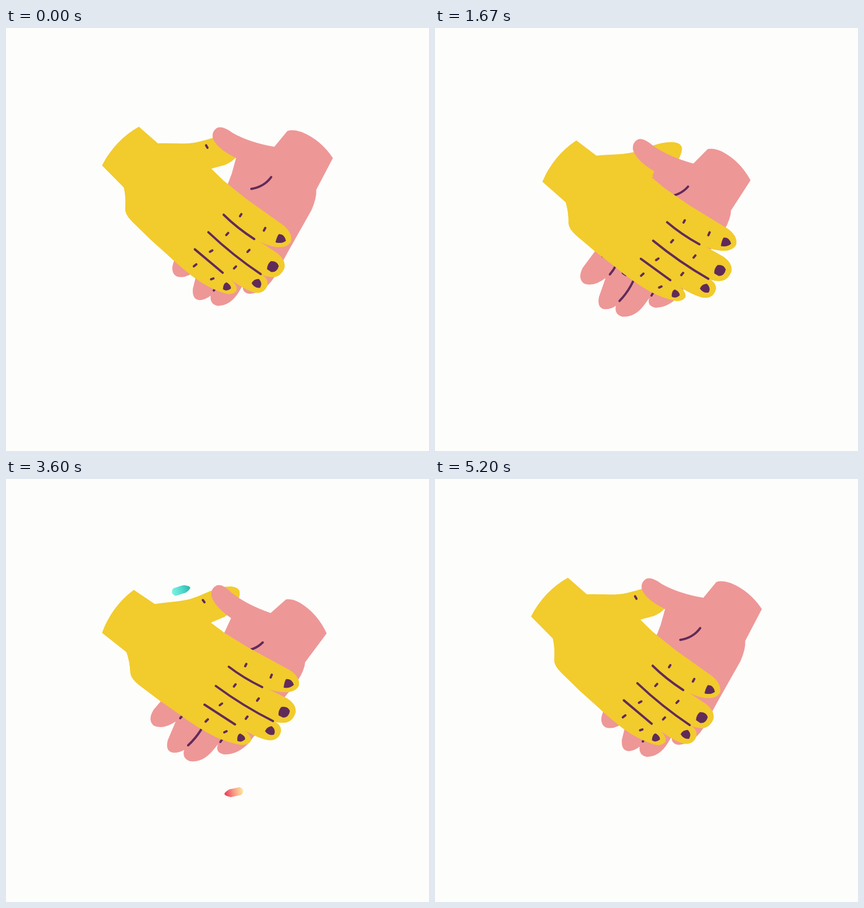
These frames come from a looping animation (748x748 px, 5.23 s). An HTML page with a canvas:

```html
<!DOCTYPE html>
<html lang="en">
<head>
<meta charset="utf-8">
<title>Handshake</title>
<style>
  html, body { margin: 0; width: 100%; height: 100%; overflow: hidden; background: #fdfdfb; }
  canvas { display: block; width: 748px; height: 748px; }
</style>
</head>
<body>
<canvas id="stage" width="748" height="748"></canvas>
<script>
const ctx = document.getElementById('stage').getContext('2d');
const YELLOW = '#f2cb2d', PINK = '#ee9797', PLUM = '#602b59';
const LOOP = 5230, CYCLE = 52;
const shape = (...parts) => new Path2D(parts.join(''));

// Open hands: the yellow one reaches across the pink one.
const open = {
  yellow: shape(
    'M170 272Q187 225 226 196L263 221C290 217 315 217 335 209C355 202 373 190 397 190',
    'Q416 191 413 206Q408 231 386 244L362 254L386 272L430 299L502 338Q520 350 518 365',
    'Q512 378 490 377Q475 376 463 371L497 388Q514 399 512 413Q506 432 488 431',
    'Q479 431 473 428Q488 435 486 447Q482 462 466 462Q450 460 422 445',
    'Q435 454 433 463Q428 471 415 470Q395 467 370 456Q338 440 305 415L272 392',
    'L235 364Q221 353 220 343Q219 322 213 306Z'),
  yellowNails: shape(
    'M491 369Q492 359 495 354Q505 352 509 364Q502 371 491 369Z',
    'M482 418Q481 409 487 403Q498 401 502 410Q500 422 490 422Z',
    'M458 446Q461 438 470 437Q478 444 474 452Q465 455 458 446Z',
    'M409 463Q408 452 414 450Q423 454 423 460Q416 467 409 463Z'),
  yellowLines: shape(
    'M394 332Q420 352 453 368M371 366Q420 402 472 428M351 399L405 434',
    'M423 331L425 327M468 351L470 346M403 367L406 363M444 392L447 388',
    'M378 400L382 397M424 424L427 420M353 429L357 425M386 448L390 446M348 214L351 218'),
  pink: shape(
    'M542 297Q526 262 495 243Q480 235 470 237L443 261Q400 246 374 225Q358 209 348 212',
    'Q337 217 338 230Q343 249 373 270L361 296L330 350L270 392L236 432Q225 450 236 460',
    'Q252 468 275 453L261 486Q256 507 272 508Q282 508 290 503Q286 518 300 523',
    'Q322 526 340 505L350 493Q344 507 360 511Q385 512 405 490L439 446L490 382',
    'Q503 362 504 348Z'),
  pinkLines: shape(
    'M272 414L278 417M302 413Q298 432 283 447M306 446L311 450M334 438Q322 472 297 495',
    'M341 465L348 467M369 460Q364 477 354 489M380 463L382 465'),
  crease: shape('M391 328Q414 328 429 313')
};

// Closed grip.
const grip = {
  yellow: shape(
    'M213 311L217 301Q238 266 266 235L300 257Q345 253 367 261L384 267L515 342',
    'Q526 350 524 370Q520 392 499 395Q504 410 494 423Q482 437 467 435Q468 452 455 459',
    'Q445 464 435 463Q434 478 422 483Q410 486 400 481L300 440L265 397',
    'Q258 380 257 362Q255 348 252 345Z'),
  yellowLines: shape(
    'M427 361Q460 384 498 396M401 392Q435 424 467 436M413 450L435 463',
    'M510 373L511 370M482 420L486 416M450 453L453 450M425 475L428 471'),
  pink: shape(
    'M442 273L470 249Q502 247 525 275Q539 294 543 308L513 346Q500 351 470 342',
    'Q435 328 401 300Q390 320 365 325Q340 328 337 310Q337 298 350 288',
    'Q370 265 388 260Q418 252 442 273Z',
    'M263 408Q266 380 290 361Q308 350 318 360Q328 375 321 394L299 432',
    'Q285 442 272 436Q261 428 263 408Z',
    'M295 440Q305 405 325 392Q345 383 356 396Q362 405 358 415Q345 450 331 462',
    'Q315 472 299 466Q290 458 295 440Z',
    'M333 458L360 409Q380 399 389 408Q395 420 392 432Q388 460 372 477',
    'Q355 492 335 485Q327 472 333 458Z',
    'M374 470Q385 440 392 428Q407 425 411 440Q412 465 397 488Q385 497 374 489Q371 478 374 470Z'),
  nails: shape(
    'M338 308Q345 293 353 291Q360 300 352 307Q340 316 337 310Z',
    'M293 370Q300 361 312 361Q318 372 315 379Q302 384 293 370Z',
    'M328 406Q333 395 343 395Q355 402 351 414Q338 421 328 406Z',
    'M364 418Q370 408 382 409Q390 420 386 430Q374 434 364 418Z',
    'M394 441Q398 433 407 434Q412 443 408 448Q398 449 394 441Z'),
  pinkLines: shape(
    'M377 270L379 273M381 267L383 273M442 273Q453 283 457 299Q469 300 481 313',
    'M321 394L301 426M359 411Q349 441 334 458M390 430Q392 450 377 469')
};

// Rows: step, yellow x, y, angle, pink x, y, angle, crease lift
const POSES = [
  [0, 0, -29, 7.1, 36, -67, -9.1, 0],
  [4, 0, 0, 0, 25, -24, 0, 0],
  [13, 38, 24, 0, 0, 0, 0, 1],
  [16, 42, 32, 0, 1, 8, 0, 1],
  [49, 30, 14, 1, 6, -8, -1, 1],
  [52, 0, -29, 7.1, 36, -67, -9.1, 0]
];
const GRIP_FROM = 16, GRIP_TO = 48;

// Rows: step, head, tail, share of the solid part, half width
const SWEEP = [
  [3, 0, 0, 1, 5],
  [4, .045, 0, 1, 7],
  [13, .27, .03, .8, 10],
  [16, .5, .12, .75, 11],
  [20, .72, .3, .68, 11],
  [25, .88, .55, .6, 12],
  [29, .945, .7, .55, 12],
  [30, .975, .75, .52, 11],
  [32, .995, .83, .55, 11],
  [36, 1, 1, .6, 5]
];

// Joined cubic curves, measured once so that places are shares of the length.
function track(curve, colors) {
  const points = [], sums = [0];
  for (let c = 0; c + 7 < curve.length; c += 6) {
    for (let i = c ? 1 : 0; i <= 40; i++) {
      const t = i / 40, r = 1 - t;
      const axis = k => r * r * r * curve[c + k] + 3 * r * r * t * curve[c + k + 2]
        + 3 * r * t * t * curve[c + k + 4] + t * t * t * curve[c + k + 6];
      points.push([axis(0), axis(1)]);
    }
  }
  for (let i = 1; i < points.length; i++) {
    const [a, b] = [points[i - 1], points[i]];
    sums.push(sums[i - 1] + Math.hypot(b[0] - a[0], b[1] - a[1]));
  }
  return { points, sums, length: sums[sums.length - 1], colors };
}

const TRACKS = [
  track([326, 192, 262, 206, 205, 250, 158, 292, 100, 350, 58, 420, 85, 490,
    105, 545, 170, 580, 240, 586, 290, 590, 340, 584, 380, 566],
    ['#80f2e4', '#54dccf', '#2db5ab']),
  track([386, 557, 450, 550, 520, 505, 562, 464, 630, 400, 690, 320, 670, 260,
    655, 210, 590, 180, 540, 170, 490, 158, 440, 160, 393, 172],
    ['#fce9a4', '#f99c83', '#ec3358'])
];

function sample(rows, x) {
  let i = 1;
  while (i < rows.length - 1 && rows[i][0] < x) i++;
  const a = rows[i - 1], b = rows[i];
  const k = Math.min(1, Math.max(0, (x - a[0]) / (b[0] - a[0])));
  return a.map((v, j) => v + (b[j] - v) * k);
}

function fill(path, color) {
  ctx.fillStyle = color;
  ctx.fill(path);
}

function line(path) {
  ctx.strokeStyle = PLUM;
  ctx.stroke(path);
}

function placed(cx, cy, x, y, deg, draw) {
  ctx.save();
  ctx.translate(cx + x, cy + y);
  ctx.rotate(deg * Math.PI / 180);
  ctx.translate(-cx, -cy);
  draw();
  ctx.restore();
}

function drawOpen(step) {
  const [, yx, yy, yr, px, py, pr, lift] = sample(POSES, step);
  placed(170, 272, yx, yy, yr, () => {
    fill(open.yellow, YELLOW);
    line(open.yellowLines);
  });
  placed(542, 297, px, py, pr, () => {
    fill(open.pink, PINK);
    line(open.pinkLines);
    ctx.translate(3 * lift, -18 * lift);
    line(open.crease);
  });
  // Palm and fingers lie in front, the thumb stays behind.
  placed(170, 272, yx, yy, yr, () => {
    ctx.beginPath();
    ctx.rect(0, 252, 748, 400);
    ctx.clip();
    fill(open.yellow, YELLOW);
    fill(open.yellowNails, PLUM);
    line(open.yellowLines);
  });
}

function drawGrip() {
  fill(grip.yellow, YELLOW);
  line(grip.yellowLines);
  fill(grip.pink, PINK);
  fill(grip.nails, PLUM);
  line(grip.pinkLines);
}

function pointOn(t, share, off = 0) {
  const d = Math.min(1, Math.max(0, share)) * t.length;
  let i = 1;
  while (i < t.sums.length - 1 && t.sums[i] < d) i++;
  const [ax, ay] = t.points[i - 1], [bx, by] = t.points[i];
  const n = t.sums[i] - t.sums[i - 1], k = (d - t.sums[i - 1]) / n;
  const dx = bx - ax, dy = by - ay;
  return [ax + dx * k - dy / n * off, ay + dy * k + dx / n * off];
}

// A tapered ribbon that follows the track from one place to another.
function ribbon(t, from, to, off, half, taper) {
  const left = [], right = [], n = 20;
  for (let i = 0; i <= n; i++) {
    const u = i / n;
    const round = Math.sqrt(Math.min(1, u / .14));
    const end = Math.pow(Math.min(1, (1 - u) / taper), .6);
    const s = from + (to - from) * u, w = half * round * end;
    left.push(pointOn(t, s, off * round + w));
    right.unshift(pointOn(t, s, off * round - w));
  }
  ctx.beginPath();
  left.concat(right).forEach(p => ctx.lineTo(p[0], p[1]));
  ctx.closePath();
  ctx.fill();
}

function drawSweep(t, step) {
  if (step <= 3 || step >= 36) return;
  const [, head, tail, solid, half] = sample(SWEEP, step);
  const span = head - tail, end = head - span * solid;
  const grad = ctx.createLinearGradient(...pointOn(t, head), ...pointOn(t, tail));
  t.colors.forEach((c, i) => grad.addColorStop(i / 2, c));
  ctx.fillStyle = grad;
  if (solid > .97) {
    ribbon(t, head, end, 0, half, .3);
    return;
  }
  [.82, 1, .72, .94, .78].forEach((len, j) =>
    ribbon(t, head, head - span * solid * len, (j - 2) * half * .38, half * .27, .45));
  ribbon(t, head, head - span * solid * .8, 0, half * .9, .35);
  const bit = (share, size) => {
    const s = head - span * share, d = size / t.length;
    ribbon(t, s + d, s - d, 0, size * .5, .3);
  };
  if (step > 20) bit(solid + (1 - solid) * .4, 8);
  bit(.98, step > 20 ? 5 : 7);
}

function render(step) {
  ctx.fillStyle = '#fdfdfb';
  ctx.fillRect(0, 0, 748, 748);
  ctx.lineWidth = 4;
  ctx.lineCap = ctx.lineJoin = 'round';
  if (step >= GRIP_FROM && step <= GRIP_TO) drawGrip();
  else drawOpen(step);
  TRACKS.forEach(t => drawSweep(t, step));
}

const start = performance.now();
let shown = -1;
function tick() {
  const ms = (performance.now() - start) % LOOP;
  const step = Math.floor((ms + 4) * .03) % CYCLE;
  if (step !== shown) render(shown = step);
  requestAnimationFrame(tick);
}
tick();
</script>
</body>
</html>
```
